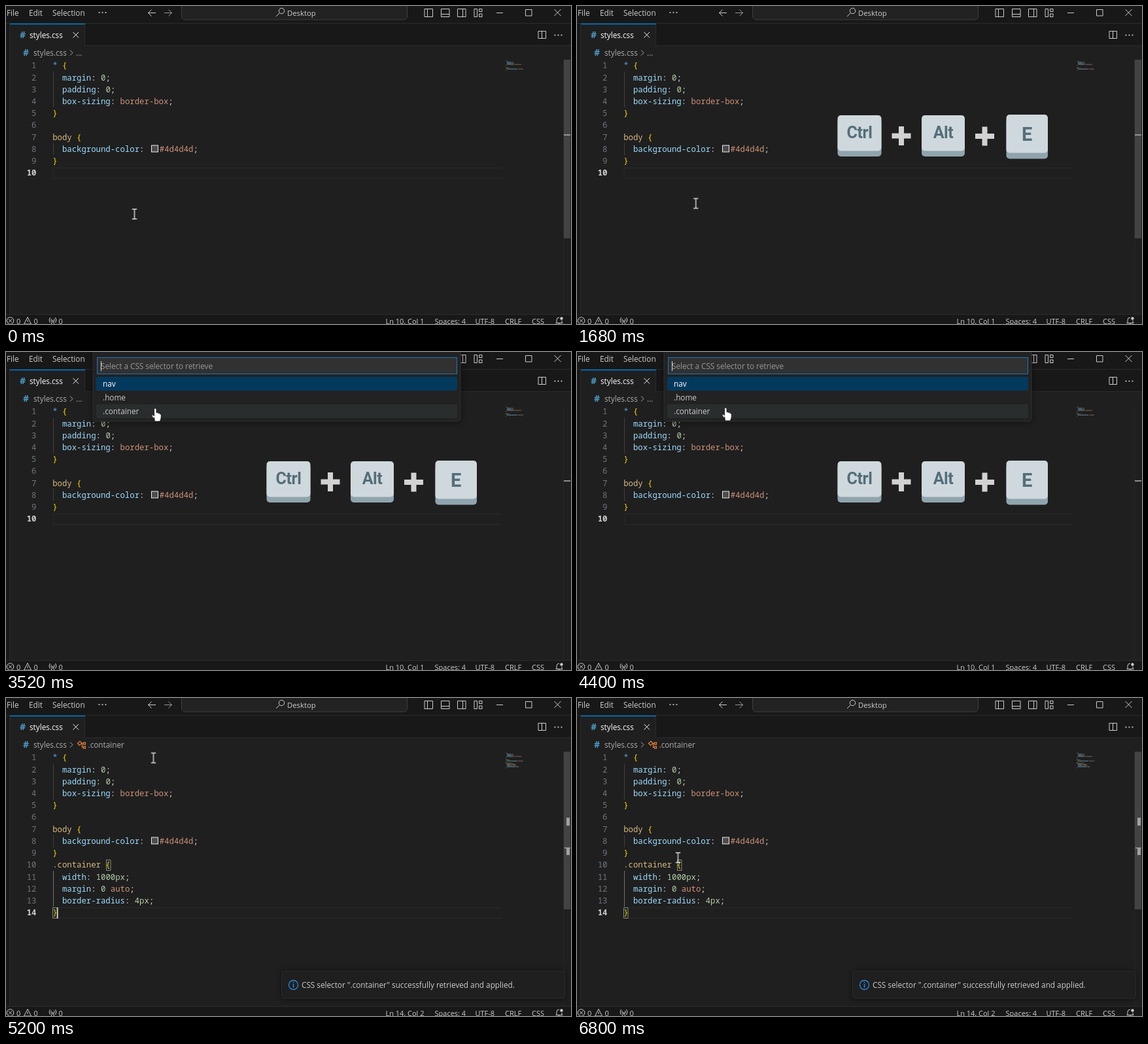
Recreate the animation shown at these times as an HTML page. Size 864x486 px, loop 6.88 s.

```html
<!DOCTYPE html>
<html lang="en">
<head>
<meta charset="utf-8">
<title>Editor</title>
<style>
  html, body { margin: 0; width: 100%; height: 100%; overflow: hidden; background: #1f1f1f; }
  svg { display: block; width: 864px; height: 486px; }
  text { font: 11.75px "Open Sans", "Noto Sans", sans-serif; fill: #ccc; white-space: pre; }
  .small text { font-size: 11px; }
  .code text { font: 12.3px "Noto Sans Mono", "DejaVu Sans Mono", monospace; fill: #d4d4d4; }
  .code .num { fill: #6e7681; text-anchor: end; }
  .code .active { fill: #d0d0d0; font-weight: 700; }
  .hash { font-weight: 700; font-size: 14px; fill: #4a9cc4; }
  .key text { font: 700 25px Roboto, sans-serif; letter-spacing: -.4px; fill: #546e7a; text-anchor: middle; }
  .line { fill: none; stroke: #ccc; stroke-width: 1; }
  .guide { stroke: #404040; }
  .current { fill: none; stroke: #2a2a2a; }
  .match { fill: rgba(0, 100, 0, .1); stroke: #888; }
  .float { filter: drop-shadow(0 1px 4px rgba(0, 0, 0, .5)); }

  .anim { animation: 6880ms step-end infinite; }
  .before { animation-name: before; }
  .after { animation-name: after; }
  .crumb0 { animation-name: crumb0; }
  .crumb1 { animation-name: crumb1; }
  .alt { animation-name: alt; }
  .plain { animation-name: plain; }
  .picker { animation-name: picker; }
  .hover { animation-name: hover; }
  .beam { animation-name: beam; }
  .caret1 { animation-name: caret1; }
  .caret2 { animation-name: caret2; }
  .caret3 { animation-name: caret3; }
  .keys { animation-name: keys; animation-timing-function: linear; }
  .slider { animation-name: slider; animation-timing-function: linear; }
  .toast { animation-name: toast; animation-timing-function: ease-out; }
  .mouse { animation-name: mouse; animation-timing-function: ease-in-out; }

  @keyframes before { 0% { opacity: 1 } 70.93%, 100% { opacity: 0 } }
  @keyframes after { 0% { opacity: 0 } 70.93%, 100% { opacity: 1 } }
  @keyframes crumb0 { 0% { opacity: 1 } 75.58%, 100% { opacity: 0 } }
  @keyframes crumb1 { 0% { opacity: 0 } 75.58%, 100% { opacity: 1 } }
  @keyframes alt { 0%, 37.2%, 100% { opacity: 0 } 29.06% { opacity: 1 } }
  @keyframes plain { 0%, 37.2%, 100% { opacity: 1 } 29.06% { opacity: 0 } }
  @keyframes picker { 0%, 66.27%, 100% { opacity: 0 } 32.55% { opacity: 1 } }
  @keyframes hover { 0%, 66.27%, 100% { opacity: 0 } 47.67% { opacity: 1 } }
  @keyframes beam { 0%, 66.27%, 100% { opacity: 1 } 47.67% { opacity: 0 } }
  @keyframes caret1 { 0%, 9.3%, 23.25%, 100% { opacity: 0 } 2.32%, 16.27% { opacity: 1 } }
  @keyframes caret2 { 0%, 47.67%, 61.62%, 100% { opacity: 1 } 40.69%, 54.65% { opacity: 0 } }
  @keyframes caret3 { 0%, 86.04% { opacity: 1 } 77.9%, 93.02%, 100% { opacity: 0 } }
  @keyframes keys { 0%, 5.81% { opacity: 0 } 8.13%, 66.27% { opacity: 1 } 66.28%, 100% { opacity: 0 } }
  @keyframes slider { 0%, 43% { opacity: 1 } 50%, 66.27% { opacity: 0 } 67.44%, 100% { opacity: 1 } }
  @keyframes toast {
    0%, 70.93% { transform: translateY(42px); opacity: 0 }
    75.58%, 100% { transform: none; opacity: 1 }
  }
  @keyframes mouse {
    0% { transform: translate(196.5px, 318px) }
    10.46%, 20% { transform: translate(177.5px, 302.5px) }
    34.88%, 40.7% { transform: translate(200.5px, 298px) }
    47.67%, 51.2% { transform: translate(230px, 95px) }
    66.27% { transform: translate(229px, 94px) }
    72.09%, 75.58% { transform: translate(225.5px, 91.5px) }
    84.88% { transform: translate(203px, 191px) }
    98.8%, 100% { transform: translate(154.5px, 244px) }
  }
</style>
</head>
<body>
<svg viewBox="0 0 864 486">
  <defs>
    <clipPath id="toastArea"><path d="M400 380H864V467H400z"/></clipPath>
    <g id="plus"><path d="M-14.5 0H14.5M0-14.5V14.5" stroke="#d2d2d2" stroke-width="8"/></g>
    <g id="dots" fill="#ccc"><circle cx="-5" r="1.1"/><circle r="1.1"/><circle cx="5" r="1.1"/></g>
  </defs>

  <!-- window frame -->
  <path d="M0 0H864V60H0zM0 60H5V486H0zM0 471H864V486H0z" fill="#181818"/>
  <path d="M0 26.5H864M121 60.5H864M120.5 27V60M5.5 27V471M0 471.5H864" class="line" style="stroke:#2b2b2b"/>
  <path d="M6 28H120V61H6z" fill="#1f1f1f"/>
  <path d="M6 27.5H121" stroke="#0078d4" stroke-width="1.5"/>

  <!-- title bar -->
  <text x="1" y="14.5">File</text>
  <text x="35" y="14.5">Edit</text>
  <text x="71" y="14.5">Selection</text>
  <path class="anim alt line" d="M1 16.5H7M35 16.5H41M71 16.5H78"/>
  <use href="#dots" x="147.5" y="10"/>
  <path class="line" d="M229 10.5H217.5M222.5 5.5L217.5 10.5L222.5 15.5"/>
  <path class="line" opacity=".7" d="M242 10.5H253.5M248.5 5.5L253.5 10.5L248.5 15.5"/>
  <rect x="268.5" y="-6" width="345" height="27" rx="5" fill="#222" stroke="#3f3f3f"/>
  <g class="line"><circle cx="421.5" cy="7.5" r="4.2"/><path d="M418.5 10.5L413 16"/></g>
  <text x="430" y="14.5" style="font-size:11.3px">Desktop</text>
  <g class="line">
    <path d="M640 4.5H652.5V16.5H640zM644.5 4.5V16.5"/>
    <path d="M665.5 4.5H678V16.5H665.5zM665.5 12.5H678"/>
    <path d="M690.5 4.5H703V16.5H690.5zM698.5 4.5V16.5"/>
    <path d="M716 4.5H720.5V16.5H716zM723.5 4.5H728V8.5H723.5zM723.5 12H728V16.5H723.5z"/>
    <path d="M750 10.5H760M794.5 5.5H804V15H794.5zM838.5 5L848.5 15M848.5 5L838.5 15"/>
  </g>

  <!-- tab and breadcrumb -->
  <text x="21" y="49" class="hash">#</text>
  <text x="36" y="48.5" fill="#fff" style="fill:#fff">styles.css</text>
  <path class="line" style="stroke:#eee" d="M102.5 40L111 48.5M111 40L102.5 48.5"/>
  <path class="line" d="M814 38.5H825.5V49.5H814z"/>
  <path class="anim plain line" d="M819.5 38.5V49.5"/>
  <path class="anim alt line" d="M814 44H825.5"/>
  <use href="#dots" x="844.5" y="44.5"/>
  <text x="26" y="76" class="hash">#</text>
  <g opacity=".82">
    <text x="42" y="75.5">styles.css</text>
    <path class="line" d="M98 67.5L102 71.5L98 75.5"/>
    <text class="anim crumb0" x="107" y="75.5">...</text>
    <text class="anim crumb1" x="125.5" y="75.5">.container</text>
  </g>
  <g class="anim crumb1" fill="none" stroke="#e8803a" stroke-width="1.2">
    <path d="M109.5 69.5L113 66L116 69L112.5 72.5zM115 69.5H119M116.5 69.5V75.5H119"/>
    <rect x="118.5" y="68" width="3" height="3"/><rect x="118.5" y="74" width="3" height="3"/>
  </g>

  <!-- editor -->
  <path class="guide" d="M72.5 100V155M72.5 209V228"/>
  <g class="anim before">
    <path class="current" d="M757 247.5H72V263.5H757"/>
    <path class="anim caret1" d="M72.5 247V263" stroke="#aeafad" stroke-width="1.5"/>
  </g>
  <g class="anim after">
    <path class="current" d="M757 320.5H72V336.5H757"/>
    <path class="guide" style="stroke:#707070" d="M72.5 264V319"/>
    <path class="match" d="M153.5 247.5H160V263.5H153.5zM71.5 320.5H78V336.5H71.5z"/>
  </g>
  <g class="code" id="base"></g>
  <g class="code anim before" id="empty"></g>
  <g class="code anim after" id="added"></g>
  <rect x="222.5" y="213" width="10" height="10" fill="#4d4d4d" stroke="#eee"/>
  <g class="anim after"><path class="anim caret3" d="M78.8 320V337" stroke="#ddd" stroke-width="1.5"/></g>

  <!-- scrollbar and overview marks -->
  <path d="M852.5 82V471" stroke="#272727"/>
  <g class="anim slider">
    <path class="anim before" d="M853 82H863V355H853z" fill="#434343"/>
    <path class="anim after" d="M853 82H863V323H853z" fill="#434343"/>
  </g>
  <path class="anim before" d="M853 197H863" stroke="#aaa" stroke-width="1.6"/>
  <path class="anim after" d="M857 183H862V195H857zM854 228.5H863V230H862V240H857V230H854z" fill="#a0a0a0"/>

  <!-- status bar -->
  <g class="small">
    <g class="line">
      <circle cx="6.5" cy="481" r="5.3"/><path d="M4 478.5L9 483.5M9 478.5L4 483.5"/>
      <path d="M33 475.5L38.5 486H27.5zM33 479.5V483"/>
      <path d="M67.5 476Q64.5 480 67.5 484M75.5 476Q78.5 480 75.5 484M69.5 478Q68 480 69.5 482M73.5 478Q75 480 73.5 482M71.5 480L69 487M71.5 480L74 487"/>
      <path d="M840.5 484.5H851.5M842 484V480Q842 476 846 476M850 480.5V484M844.5 486H847.5"/>
    </g>
    <circle cx="849.5" cy="477.5" r="2.2" fill="#ccc"/>
    <text x="16" y="485.5">0</text>
    <text x="42.5" y="485.5">0</text>
    <text x="80.5" y="485.5">0</text>
    <text class="anim before" x="580.5" y="485.5">Ln 10, Col 1</text>
    <text class="anim after" x="580.5" y="485.5">Ln 14, Col 2</text>
    <text x="655.5" y="485.5">Spaces: 4</text>
    <text x="717.5" y="485.5">UTF-8</text>
    <text x="763" y="485.5">CRLF</text>
    <text x="804" y="485.5">CSS</text>
  </g>

  <!-- key caps -->
  <g class="anim keys">
    <g class="key">
      <rect x="398.5" y="172" width="67" height="58" rx="5" fill="#90a4ae"/>
      <rect x="398.5" y="167" width="67" height="54.5" rx="5" fill="#cfd8dc"/>
      <text x="432" y="202">Ctrl</text>
      <rect x="527" y="172" width="66" height="58" rx="5" fill="#90a4ae"/>
      <rect x="527" y="167" width="66" height="54.5" rx="5" fill="#cfd8dc"/>
      <text x="560" y="202">Alt</text>
      <rect x="656.5" y="172" width="63.5" height="61.5" rx="5" fill="#90a4ae"/>
      <rect x="656.5" y="166" width="63.5" height="58.5" rx="5" fill="#cfd8dc"/>
      <text x="688" y="206" style="font-size:29px">E</text>
    </g>
    <use href="#plus" x="496" y="198.5"/>
    <use href="#plus" x="623.5" y="199"/>
  </g>

  <!-- selector picker -->
  <g class="anim picker">
    <rect class="float" x="133" y="-6" width="562" height="112" rx="5" fill="#222" stroke="#303030"/>
    <rect x="139.5" y="8.5" width="550" height="25" fill="#313131" stroke="#1c74b8"/>
    <text x="145" y="25.5" style="fill:#989898">Select a CSS selector to retrieve</text>
    <path class="anim caret2" d="M145.5 14V29" stroke="#ddd"/>
    <rect x="138" y="38" width="552" height="21" rx="2" fill="#04395e"/>
    <rect class="anim hover" x="138" y="80" width="552" height="21" rx="2" fill="#2a2d2e"/>
    <text x="148" y="52.5" style="fill:#fff">nav</text>
    <text x="148" y="73.8">.home</text>
    <text x="148" y="95">.container</text>
  </g>

  <!-- notification -->
  <g clip-path="url(#toastArea)">
    <g class="anim toast">
      <rect class="float" x="421.5" y="417.5" width="433" height="41.5" rx="4" fill="#1f1f1f" stroke="#2b2b2b"/>
      <circle cx="439.5" cy="438.5" r="7" fill="none" stroke="#2b8be0" stroke-width="1.3"/>
      <path d="M439.5 434V435.6M439.5 437V442.5" stroke="#2b8be0" stroke-width="1.5"/>
      <text x="452" y="442.5">CSS selector ".container" successfully retrieved and applied.</text>
    </g>
  </g>

  <!-- pointer -->
  <g class="anim mouse">
    <path class="anim beam" d="M-3.5-7.5H-1L0-7L1-7.5H3.5M0-7V7M-3.5 7.5H-1L0 7L1 7.5H3.5" fill="none" stroke="#eee" stroke-width="1.3"/>
    <path class="anim hover" d="M-3.5-8Q-2-10 0-8V-2Q1.5-3.5 2.5-1.5Q4-2.5 5-.5Q7-1 7.2 1.5V5Q7 8 5.2 11H-2.5Q-4-.0 -3.5 8L-6.8 3Q-7.5 .5-5.5 1L-3.5 3z" fill="#fff" stroke="#111" stroke-width=".8"/>
  </g>
</svg>
<script>
  const NS = "http://www.w3.org/2000/svg";
  const LEFT = 71.2, CHAR = 7.38, ROW = 18.23;
  const COLOR = { sel: "#d7ba7d", star: "#569cd6", brace: "#ffd700", prop: "#9cdcfe", num: "#b5cea8", word: "#ce9178", punct: "#d4d4d4" };

  function add(parent, tag, attrs, text = "") {
    const el = parent.appendChild(document.createElementNS(NS, tag));
    for (const k in attrs) el.setAttribute(k, attrs[k]);
    el.textContent = text;
    return el;
  }

  function tokens(line) {
    const rule = line.match(/^([\w-]+): (.+);$/);
    if (rule) {
      const values = rule[2].split(" ").flatMap((v, i) =>
        [[i ? " " : "", "punct"], [v, /^\d/.test(v) ? "num" : "word"]]);
      return [[rule[1], "prop"], [": ", "punct"], ...values, [";", "punct"]];
    }
    return line.split(/(?=[{}])/).map(s =>
      [s, /[{}]/.test(s) ? "brace" : s[0] === "*" ? "star" : "sel"]);
  }

  function drawRow(id, row, source, active) {
    const group = document.getElementById(id);
    const y = 95.3 + (row - 1) * ROW;
    add(group, "text", { x: 46.5, y, class: active ? "num active" : "num" }, row);
    const line = source.trim();
    let col = source.length - line.length;
    const text = add(group, "text", { x: LEFT + col * CHAR, y });
    for (const [part, kind] of tokens(line)) {
      if (!part) continue;
      const span = add(text, "tspan", { style: `fill:${COLOR[kind]}` }, part);
      if (part[0] === "#") span.setAttribute("dx", 16); // room for the swatch
      const width = part.trim().length * .95;
      add(group, "rect", { x: 764 + col * .95, y: 83.5 + (row - 1) * 1.75, width, height: 1.1, fill: COLOR[kind], opacity: .5 });
      col += part.length;
    }
  }

  ["* {", "  margin: 0;", "  padding: 0;", "  box-sizing: border-box;", "}", "",
   "body {", "  background-color: #4d4d4d;", "}"].forEach((s, i) => drawRow("base", i + 1, s));
  drawRow("empty", 10, "", true);
  [".container {", "  width: 1000px;", "  margin: 0 auto;", "  border-radius: 4px;", "}"]
    .forEach((s, i) => drawRow("added", i + 10, s, i === 4));
</script>
</body>
</html>
```
